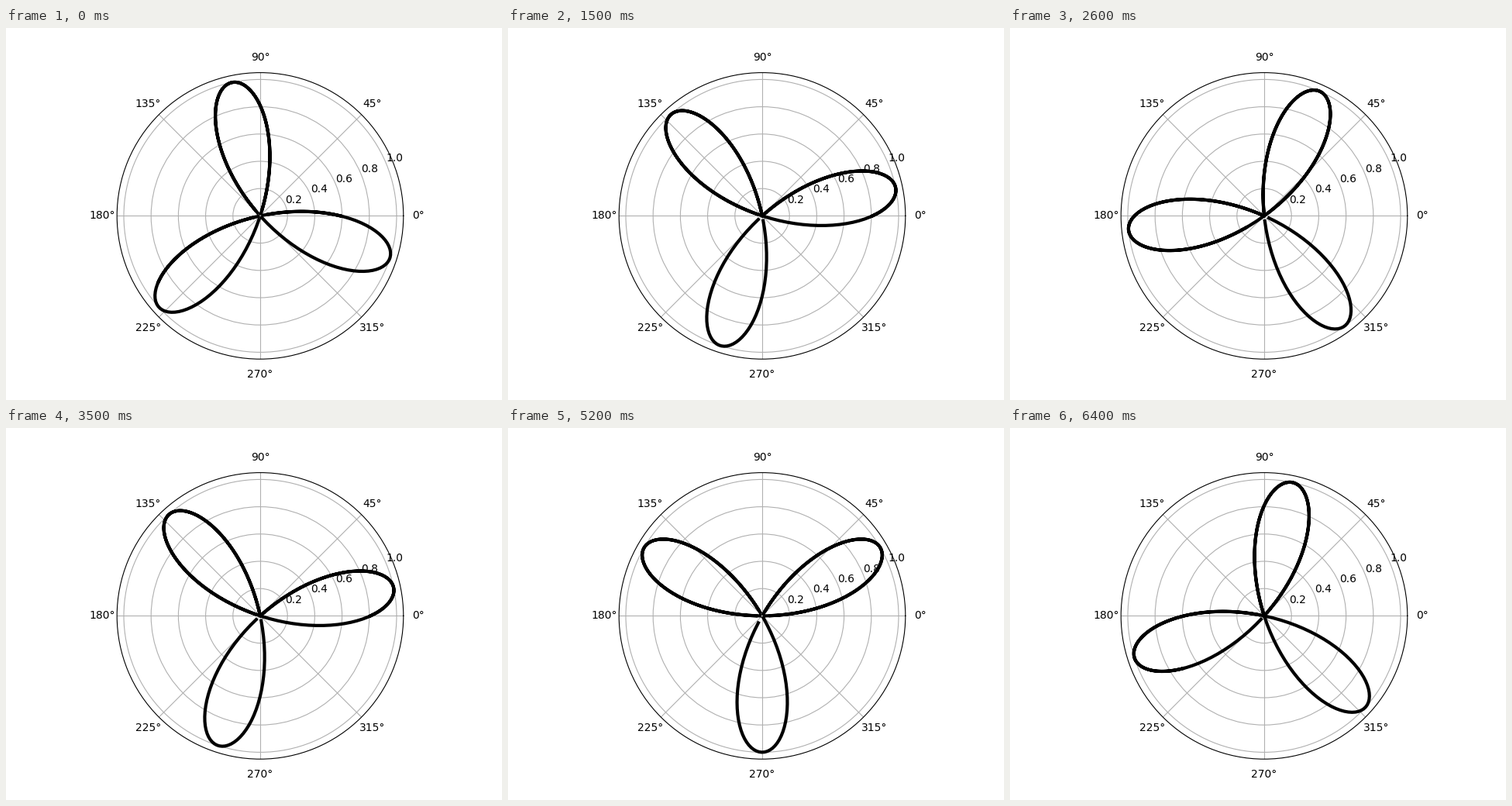
Write a matplotlib script that moves like this. It is 640x480 px and loops after 6.5 s.

```python
import numpy as np
import matplotlib.pyplot as plt
from matplotlib.animation import FuncAnimation

FRAMES = 65
INTERVAL = 100          # ms
STEP = np.pi / 10       # phase advance per frame
START = 8               # phase steps already taken at the first frame

theta = np.linspace(0, 10, 500)


def rose(frame):
    """Radius of the three-petal rose; negative lobes are left out."""
    r = np.sin(3 * theta + (frame + START) * STEP)
    return np.where(r < 0, np.nan, r)


fig = plt.figure(figsize=(6.4, 4.8), dpi=100)
ax = fig.add_subplot(projection="polar")
line, = ax.plot(theta, rose(0), color="black", lw=3)
ax.set_rlim(0, 1.05)
ax.set_rticks([0.2, 0.4, 0.6, 0.8, 1.0])


def update(frame):
    line.set_data(theta, rose(frame))
    return line,


anim = FuncAnimation(fig, update, frames=FRAMES, interval=INTERVAL,
                     repeat=True, repeat_delay=0)
plt.show()
```
